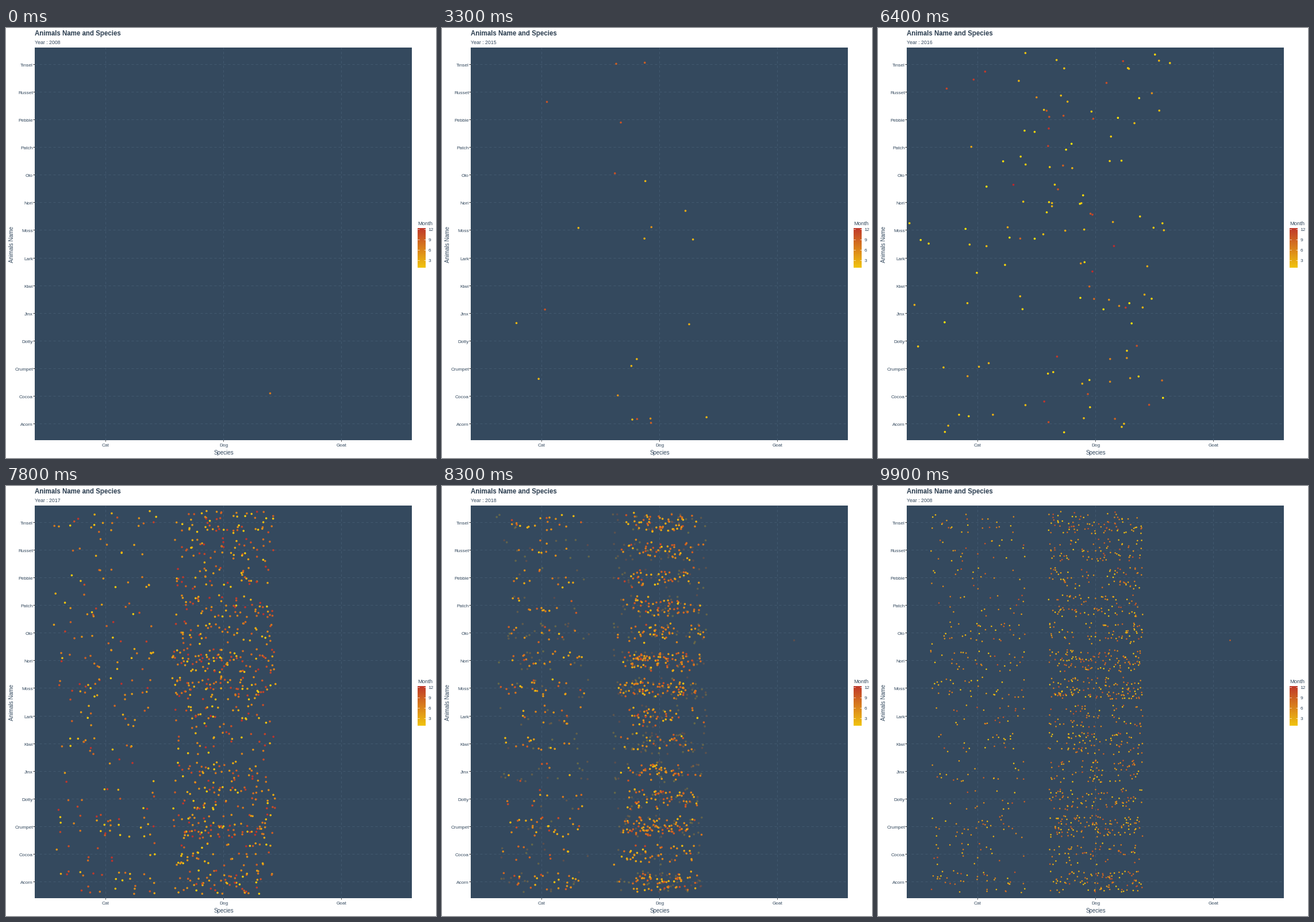
These frames come from a looping animation (748x748 px, 10000 ms). A matplotlib script:

```python
import numpy as np
import matplotlib.pyplot as plt
from matplotlib.animation import FuncAnimation

plt.rcParams["font.family"] = "Liberation Sans"
SIZE, DPI = 748, 72
INK, PANEL, GRID = "#34495E", "#34495E", "#42596F"
LOW, HIGH = np.array([241, 196, 15]) / 255, np.array([192, 57, 43]) / 255

NAMES = ["Tinsel", "Russet", "Pebble", "Patch", "Olo", "Nori", "Moss",
         "Lark", "Kiwi", "Jinx", "Dotty", "Crumpet", "Cocoa", "Acorn"]
POPULARITY = np.array([5, 4, 4, 5, 5, 7, 8, 4, 4, 4, 4, 7, 4, 6])
SPECIES = ["Cat", "Dog", "Goat"]
YEARS = [2008, 2014, 2015, 2016, 2017, 2018]
PERIOD, STEPS, FRAMES = 17, 7, 100


def col_x(c):
    return 173 + 205 * c


def row_y(r):
    return 63 + 48.08 * r


def color(month):
    t = (np.asarray(month, float)[:, None] - 1) / 11
    return LOW + (HIGH - LOW) * t


# --- data: one array of (x, y, month) per (species, name) group ---

def jittered(totals, months, seed):
    rng = np.random.default_rng(seed)
    groups = {}
    for c, total in enumerate(totals):
        counts = rng.multinomial(total, POPULARITY / POPULARITY.sum())
        for r, n in enumerate(counts):
            groups[c, r] = np.column_stack([
                col_x(c) + rng.uniform(-82, 82, n),
                row_y(r) + rng.uniform(-19.2, 19.2, n),
                rng.choice(months, n)])
    return groups


WINTER = [2, 2, 2, 2, 3, 5, 9, 10]
STATES = [
    {(1, 12): np.array([[459, 635, 7]])},
    {},
    jittered((5, 18), WINTER, 15),
    jittered((39, 96), WINTER, 16),
    jittered((225, 770), range(1, 13), 17),
    jittered((360, 1150), range(1, 11), 18),
]
STATES[-1][2, 4] = np.array([[612, 268, 9]])

NONE = np.empty((0, 3))


def stack(parts):
    return np.vstack([NONE, *parts])


def pair(a, b):
    """Split two states into moving (from, to), leaving and entering points."""
    src, dst, leave, enter = [], [], [], []
    for key in sorted(set(a) | set(b)):
        p, q = a.get(key, NONE), b.get(key, NONE)
        n = min(len(p), len(q))
        src.append(p[:n])
        dst.append(q[:n])
        leave.append(p[n:])
        enter.append(q[n:])
    return [stack(s) for s in (src, dst, leave, enter)]


PAIRS = [pair(s, STATES[(i + 1) % len(STATES)]) for i, s in enumerate(STATES)]


# --- motion ---

def back_in(p):
    return p ** 3 - p * np.sin(np.pi * p)


def diameter(size):
    return np.round(4.2 * size - 0.85) + 0.6


def locate(n):
    """State index and transition step (0 while holding)."""
    for i in range(len(YEARS)):
        start = min(10 + PERIOD * i, FRAMES - STEPS + 1)
        if n < start:
            return i, 0
        if n < start + STEPS - 1:
            return i, n - start + 1


def scene(i, step):
    src, dst, leave, enter = PAIRS[i]
    e = back_in(step / STEPS) if step else 0.0
    xy = np.vstack([src[:, :2] + (dst - src)[:, :2] * e,
                    leave[:, :2], enter[:, :2]])
    c0, c1 = color(src[:, 2]), color(dst[:, 2])
    rgb = np.vstack([c0 + (c1 - c0) * e, color(leave[:, 2]),
                     color(enter[:, 2])])
    counts = [len(src), len(leave), len(enter)]
    alpha = np.repeat([1, 1, np.clip(e, 0, 1)], counts)
    d = np.repeat([diameter(1), diameter(1 - e), diameter(1)], counts)
    return xy, np.column_stack([np.clip(rgb, 0, 1), alpha]), d ** 2


# --- stage ---

fig = plt.figure(figsize=(SIZE / DPI, SIZE / DPI), dpi=DPI, facecolor="white")
ax = fig.add_axes([0, 0, 1, 1])


def text(x, y, s, size, **kw):
    return ax.text(x, y, s, fontsize=size, **{"color": INK, **kw})


def line(x, y, c, w=1.0, **kw):
    ax.plot(x, y, color=c, lw=w, solid_capstyle="butt",
            dash_capstyle="butt", **kw)


ax.imshow(np.linspace(HIGH, LOW, 69)[:, None], extent=(715.5, 729.5, 416.5, 347.5),
          aspect="auto", interpolation="nearest")
ax.add_patch(plt.Rectangle((49.5, 33.5), 656, 683, fc=PANEL, ec="none"))

dashes = dict(dashes=(4, 4), zorder=1.5)
for r, name in enumerate(NAMES):
    y = round(row_y(r))
    line([49.5, 705.5], [y, y], GRID, **dashes)
    line([47, 49.5], [y, y], "#333333")
    text(46.5, y + 3.5, name, 8.3, ha="right")
for c, name in enumerate(SPECIES):
    x = col_x(c)
    line([x, x], [716.5, 33.5], GRID, **dashes)
    line([x, x], [716.5, 719], "#333333")
    text(x, 727.5, name, 8.3, ha="center")

text(50, 13, "Animals Name and Species", 11.5, weight="bold", color="#2C3E50")
text(378, 742, "Species", 9.8, ha="center")
text(13, 375.5, "Animals Name", 9.75, rotation=90, ha="center",
     va="baseline", rotation_mode="anchor")
text(715.5, 343, "Month", 9.4)
for m in (12, 9, 6, 3):
    y = 349.5 + (12 - m) * 6
    for x in (715.5, 726.7):
        line([x, x + 2.8], [y, y], "white", 0.7)
    text(734, y + 3, str(m), 8.3)

year = text(50, 28, "", 8.75)
dots = ax.scatter([], [], linewidths=0, zorder=3)
ax.set(xlim=(-0.5, SIZE - 0.5), ylim=(SIZE - 0.5, -0.5))
ax.axis("off")


def update(n):
    i, step = locate(n)
    xy, rgba, area = scene(i, step)
    dots.set_offsets(xy)
    dots.set_facecolors(rgba)
    dots.set_sizes(area)
    shown = (i + (step >= 5)) % len(YEARS)
    year.set_text(f"Year : {YEARS[shown]}")
    return dots, year


anim = FuncAnimation(fig, update, frames=FRAMES, interval=100,
                     repeat=True, repeat_delay=0)
plt.show()
```
